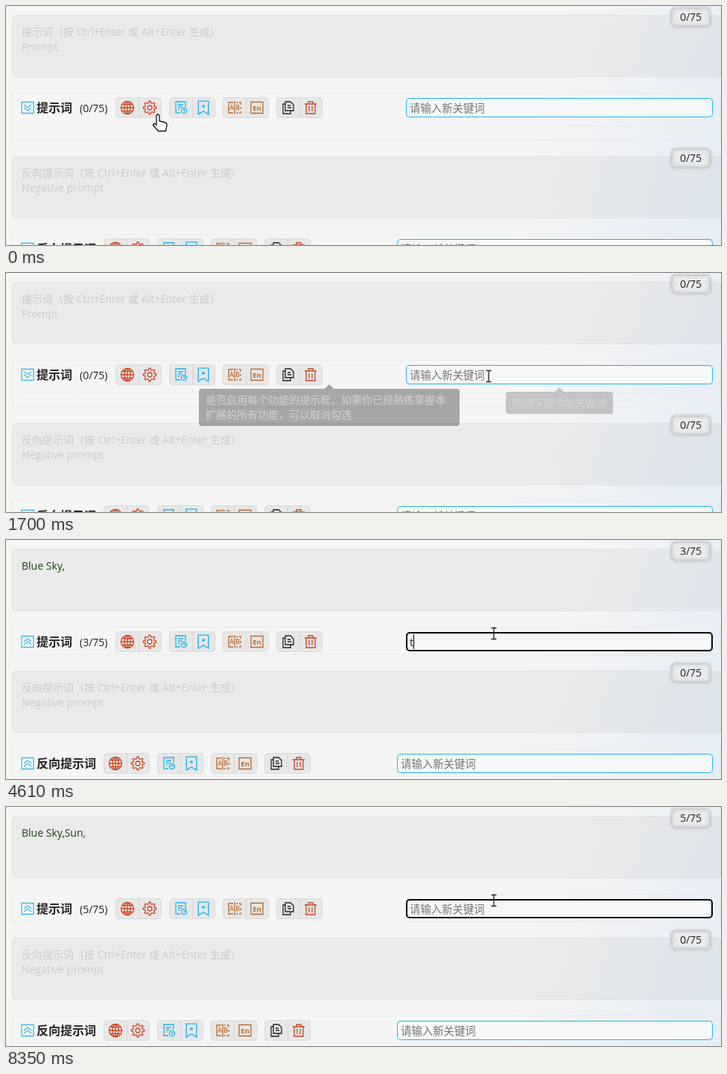
Recreate the animation shown at these times as an HTML page with a canvas. Size 960x322 px, loop 8420 ms.

```html
<!DOCTYPE html>
<html lang="zh">
<head>
<meta charset="utf-8">
<style>
html, body { margin: 0; width: 100%; height: 100%; overflow: hidden; background: #f5f5f5 }
canvas { display: block }
</style>
</head>
<body>
<canvas id="stage" width="960" height="322"></canvas>
<script>
const c = document.getElementById('stage').getContext('2d');
const LOOP = 8420;
const FONT = '"Open Sans", "Noto Sans CJK SC", "Noto Sans CJK", sans-serif';
const RED = '#cf4520', BLUE = '#1fb4ee', BROWN = '#bd6a2e', INK = '#222';

// [time, content of the keyword field]; latin letters are still being composed
const typing = [
  [1910, ''], [2700, 'l'], [2960, 'lan'], [3090, 'lant'], [3290, 'lanti'], [3420, 'lantia'],
  [3490, 'lantian'], [3620, '蓝天'], [3820, ''],
  [4610, 't'], [5070, 'ta'], [5200, 'tai'], [5340, 'taiy'], [5470, 'taiya'], [5600, 'taiyan'],
  [5740, 'taiyang'], [5870, '太阳'], [6220, ''],
  [6670, 'b'], [6800, 'ba'], [7000, 'bai'], [7070, 'baiy'], [7200, 'baiyu'], [7270, 'baiyun'],
  [7420, '白云'], [8350, '']
];
const candidates = {
  lant: '蓝天 蓝田 兰亭 烂摊', lan: '蓝 烂 栏 懒', l: '了 来 里 啦',
  taiy: '太阳 泰阳 太样', t: '他 太 台 抬', baiy: '白云 百韵 摆匀', b: '不 白 百 吧'
};
const pointer = [
  [0, 204, 146], [70, 204, 146], [200, 196, 138], [330, 206, 138], [560, 241, 138],
  [800, 241, 138], [970, 282, 138], [1240, 438, 138], [1460, 442, 138],
  [1700, 648, 139], [1840, 654, 138], [3819, 654, 138], [3820, 655, 126], [LOOP, 655, 126]
];

const ring = (rx, ry, x = 0, y = 0) =>
  `M${x - rx} ${y}a${rx} ${ry} 0 1 0 ${2 * rx} 0a${rx} ${ry} 0 1 0 ${-2 * rx} 0z`;
const polar = (n, radius) => 'M' + Array.from({ length: n }, (_, i) => {
  const a = (i - .5) / n * 2 * Math.PI - Math.PI / 2;
  return [radius(i) * Math.cos(a), radius(i) * Math.sin(a)].map(v => v.toFixed(2));
}).join('L') + 'z';

const shapes = {
  globe: ring(8.5, 8.5) + ring(4, 8.5) + 'M0-8.5v17M-8.5 0h17M-7.2-4.5h14.4M-7.2 4.5h14.4',
  gear: polar(32, i => i % 4 < 2 ? 8.8 : 6.4) + ring(3, 3),
  history: 'M6-1v-7h-13v15h6M-4-4h7M-4-1h5M-4 2h2' + ring(3.6, 3.6, 4, 4) + 'M4 2v2h2',
  bookmark: 'M-6.5-8.5h13v17l-6.5-4l-6.5 4z',
  star: polar(10, i => i % 2 ? 1.6 : 3.6),
  split: 'M-2-7h-6v14h6M0-9v18M2-7h2M6-7h2v3M8-1v3M8 5v2h-2M4 7h-2',
  frame: 'M-8-7.5h16v15h-16z',
  copy: 'M-4-8h7l4 4v8h-11zM-4-5h-3v13h10v-4M-1-3h4M-1 0h5',
  trash: 'M-8-5h16M-3-5v-3h6v3M-6-5v13h12v-13M-2-2v7M2-2v7',
  cloud: 'M-5 5h-4a5 5 0 0 1-1-10a8 8 0 0 1 16-1a5.500 5.500 0 0 1 4 11h-3M-3 9h8M-3 9l3-3M-3 9l3 3',
  field: 'M-5-6.500h13v13h-13M-8-6.500h4M-8 6.500h4M-6-6.500v13',
  bubble: 'M-8-8h16v13h-5l-3 3l-3-3h-5z',
  down: 'M-8-7.500h16v15h-16zM-5-4l5 4l5-4M-5 0l5 4l5-4',
  up: 'M-8-7.500h16v15h-16zM-5 0l5-4l5 4M-5 4l5-4l5 4',
  tick: 'M-4 0l3 3l5-6',
  hand: 'M-2 2q2-4 4 0v7l6 1.500q4 1 4 4l-1.500 8h-10l-7-8q1-3 3-1.500l1.500 1.500z'
};
for (const k in shapes) shapes[k] = new Path2D(shapes[k]);

const clamp = v => Math.max(0, Math.min(1, v));
const fade = (t, a, b, d, e) => Math.min(clamp((t - a) / (b - a)), clamp((e - t) / (e - d)));

function text(s, x, y, color, size = 14, weight = 400, align = 'left') {
  c.font = `${weight} ${size}px ${FONT}`;
  c.textAlign = align;
  c.fillStyle = color;
  c.fillText(s, x, y);
  return c.measureText(s).width;
}

function box(x, y, w, h, r, fill, stroke, line = 1) {
  c.beginPath();
  c.roundRect(x + line / 2, y + line / 2, w - line, h - line, r);
  if (fill) { c.fillStyle = fill; c.fill(); }
  if (stroke) { c.strokeStyle = stroke; c.lineWidth = line; c.stroke(); }
}

function icon(name, x, y, color, scale = 1, fill) {
  c.save();
  c.translate(x, y);
  c.scale(scale, scale);
  if (fill) { c.fillStyle = fill; c.fill(shapes[name]); }
  c.strokeStyle = color;
  c.lineWidth = 1.3;
  c.stroke(shapes[name]);
  c.restore();
}

function splitIcon(x, y, color, s = 1) {
  icon('split', x, y, color, s);
  text('A', x - 4 * s, y + 3.2 * s, color, 8.5 * s, 600, 'center');
  text('B', x + 4 * s, y + 3.2 * s, color, 8.5 * s, 600, 'center');
}

function englishIcon(x, y, color, s = 1) {
  icon('frame', x, y, color, s);
  text('En', x, y + 3.5 * s, color, 9.5 * s, 700, 'center');
}

function promptArea(y, count, alpha = 1) {
  box(8, y, 952, 84, 4, 'rgba(0,0,0,.043)', '#e0e1e2');
  c.save();
  c.globalAlpha = alpha;
  c.shadowColor = 'rgba(0,0,0,.15)';
  c.shadowBlur = 4;
  box(893, y - 10, 53, 26, 5, '#e9eaeb', '#cfd0d2', 2);
  c.restore();
  c.globalAlpha = alpha;
  text(count + '/75', 919.5, y + 8, INK, 14, 400, 'center');
  c.globalAlpha = 1;
}

function placeholder(y, first, second) {
  text(first + '（按 Ctrl+Enter 或 Alt+Enter 生成）', 21, y + 28, '#c9cacb');
  text(second, 21, y + 48, '#c9cacb');
}

function toolbar(y, label, groupX, folded, count) {
  c.strokeStyle = '#e9eaeb';
  c.lineWidth = 1;
  c.strokeRect(8.5, y + .5, 951, folded ? 37 : 63);
  if (!folded) {
    c.setLineDash([3, 2]);
    c.beginPath();
    c.moveTo(20, y + 44.5);
    c.lineTo(949, y + 44.5);
    c.stroke();
    c.setLineDash([]);
  }
  icon(folded ? 'up' : 'down', 29, y + 20, '#45b9e8');
  text(label, 41, y + 26, INK, 16, 700);
  if (count !== undefined) text(`(${count}/75)`, 99, y + 26, INK);
  const cy = y + 20;
  const draw = [
    x => icon('globe', x, cy, RED), x => icon('gear', x, cy, RED),
    x => icon('history', x, cy, BLUE),
    x => { icon('bookmark', x, cy, BLUE, 1.05); icon('star', x, cy - 2, BLUE, .6, BLUE); },
    x => splitIcon(x, cy, BROWN), x => englishIcon(x, cy, BROWN),
    x => icon('copy', x, cy, INK), x => icon('trash', x, cy, '#c04a24')
  ];
  for (let g = 0; g < 4; g++) {
    const x = groupX + 72 * g;
    box(x, y + 6, 62, 28, 4, '#e7e7e7', '#dadada');
    c.fillStyle = '#d8d8d8';
    c.fillRect(x + 31, y + 7, 1, 26);
    draw[2 * g](x + 16);
    draw[2 * g + 1](x + 46);
  }
}

function tooltip(cx, y, lines, alpha, width) {
  if (alpha <= 0) return;
  c.save();
  c.globalAlpha = alpha;
  c.font = `14px ${FONT}`;
  const w = width || c.measureText(lines[0]).width + 18, x = cx - w / 2;
  box(x, y, w, 10 + 20 * lines.length, 4, 'rgba(70,70,70,.9)', null, 0);
  c.beginPath();
  c.moveTo(cx - 6, y);
  c.lineTo(cx, y - 6);
  c.lineTo(cx + 6, y);
  c.fill();
  lines.forEach((s, i) => text(s, x + 9, y + 20 + 20 * i, '#fff'));
  c.restore();
}

function settingsPanel() {
  c.save();
  c.shadowColor = 'rgba(70,130,240,.45)';
  c.shadowBlur = 5;
  box(206, 118, 260, 38, 5, '#e6f2fe', '#a3c3f5');
  c.restore();
  icon('cloud', 231, 137, '#c93a34', 1.05);
  text('API', 231, 141, '#c93a34', 9.5, 600, 'center');
  for (let x = 257; x < 420; x += 52) {
    box(x, 129, 16, 16, 3, '#0d75f8', null, 0);
    icon('tick', x + 8, 137, '#fff', 1.1);
  }
  splitIcon(286.5, 137, BROWN, 1.4);
  englishIcon(338, 137, BROWN, 1.35);
  icon('field', 390, 137, '#28364a', 1.2);
  icon('bubble', 442, 137, INK, 1.35);
  text('T', 442, 140, INK, 13, 700, 'center');
}

function inputMethod(pinyin) {
  const key = Object.keys(candidates).find(k => pinyin.startsWith(k));
  const items = candidates[key].split(' ').concat(pinyin).map((s, i) => `${i + 1}.${s}`);
  c.font = `16px ${FONT}`;
  const end = items.reduce((x, s) => x + c.measureText(s).width + 15, 561);
  const w = Math.max(296, end + 59 - 545);
  const dark = c.createLinearGradient(0, 147, 0, 222);
  dark.addColorStop(0, '#30383a');
  dark.addColorStop(1, '#1d2325');
  c.save();
  c.shadowColor = 'rgba(0,0,0,.5)';
  c.shadowBlur = 6;
  c.shadowOffsetY = 2;
  box(545, 147, w, 75, 8, dark, '#2a3032');
  c.restore();
  const caret = 562 + text(pinyin, 561, 173, '#58dcd6', 16);
  c.fillStyle = '#ccc';
  c.fillRect(caret, 159, 1, 17);
  c.fillStyle = '#475053';
  c.fillRect(559, 183, w - 28, 1);
  const glow = c.createLinearGradient(555, 0, 535 + w, 0);
  glow.addColorStop(0, 'rgba(90,220,210,0)');
  glow.addColorStop(.5, '#6fe0d8');
  glow.addColorStop(1, 'rgba(90,220,210,0)');
  c.fillStyle = glow;
  c.fillRect(555, 218, w - 20, 1);
  let x = 561;
  items.forEach((s, i) => x += text(s, x, 205, i ? '#f5c443' : '#58dcd6', 16) + 15);
  for (const [ax, dx, color] of [[x + 6, -6, '#6b623f'], [x + 12, 6, '#f5c443']]) {
    c.beginPath();
    c.moveTo(ax, 194);
    c.lineTo(ax + dx, 199.5);
    c.lineTo(ax, 205);
    c.fillStyle = color;
    c.fill();
  }
  c.beginPath();
  c.arc(545 + w - 38, 168, 10, 0, 7);
  c.fillStyle = '#f3eeee';
  c.fill();
}

function drawPointer(t) {
  const i = pointer.findIndex(p => p[0] > t);
  const [t0, x0, y0] = pointer[i - 1], [t1, x1, y1] = pointer[i];
  const k = (t - t0) / (t1 - t0);
  const x = x0 + (x1 - x0) * k, y = y0 + (y1 - y0) * k;
  if (x < 537) return icon('hand', x, y, '#111', 1, '#fff');
  c.strokeStyle = '#222';
  c.lineWidth = 1.3;
  c.stroke(new Path2D(`M${x - 3.5} ${y - 7.5}h7M${x} ${y - 7.5}v15M${x - 3.5} ${y + 7.5}h7`));
}

function field(t) {
  const focused = t >= 1910;
  box(537, 124, 412, 26, 4, '#f5f7f8', focused ? '#080808' : BLUE, focused ? 2 : 1);
  const step = typing.filter(e => e[0] <= t).pop();
  const value = step ? step[1] : '';
  const width = text(value || '请输入新关键词', 542, 143, value ? INK : '#757575', 14.4);
  if (step && t < 8350 && (t - step[0]) % 1060 < 520) {
    c.fillStyle = '#000';
    c.fillRect(542 + (value ? Math.floor(width) : 0), 127, 1, 20);
  }
  const composing = /^[a-z]/.test(value);
  if (composing && !(value.length === 1 && t < step[0] + 70)) inputMethod(value);
}

function render(t) {
  const folded = t >= 3820, shift = folded ? -26 : 0;
  const tint = c.createLinearGradient(730, 90, 960, 160);
  tint.addColorStop(0, 'rgba(222,233,246,0)');
  tint.addColorStop(1, 'rgba(222,233,246,.6)');
  c.fillStyle = '#f5f5f5';
  c.fillRect(0, 0, 960, 322);
  c.fillStyle = tint;
  c.fillRect(0, 0, 960, 322);

  const tokens = t < 4150 ? 0 : t < 6280 ? 3 : 5;
  const badge = t < 4350 ? 0 : t < 7350 ? 3 : 5;
  const pending = Math.max(fade(t, 4150, 4350, 4350, 4550), fade(t, 7000, 7350, 7350, 7690));
  promptArea(12, badge, 1 - .5 * pending);
  if (!folded) placeholder(12, '提示词', 'Prompt');
  else text(t < 4150 ? '蓝天,' : 'Blue Sky,' + (t < 6220 ? '' : t < 6280 ? '太阳,' : 'Sun,'), 21, 40, '#1d4216');
  promptArea(202 + shift, 0);
  placeholder(202 + shift, '反向提示词', 'Negative prompt');

  toolbar(117, '提示词', 147, folded, tokens);
  toolbar(307 + shift, '反向提示词', 131, folded);
  box(525, 314 + shift, 424, 26, 4, '#f5f7f8', BLUE);
  text('请输入新关键词', 530, 333 + shift, '#757575', 14.4);

  if (t >= 140 && t < 1540) settingsPanel();
  tooltip(194, 158, ['设置：翻译接口、自动翻译、提示框等'], fade(t, 130, 300, 400, 580), 264);
  tooltip(231.5, 160, ['翻译接口: Velmora / 岑禾翻译'], fade(t, 380, 520, 750, 890));
  tooltip(278, 160, ['是否自动将关键词翻译为本地语言'], fade(t, 900, 1000, 1080, 1200));
  tooltip(434, 156, ['是否启用每个功能的提示框，如果你已经熟练掌握本', '扩展的所有功能，可以取消勾选'],
    fade(t, 1250, 1400, 1560, 1840), 350);
  field(t);
  tooltip(743, 160, ['按回车键添加关键词'], fade(t, 1640, 1840, 1900, 2040));
  drawPointer(t);
}

const start = performance.now();
(function tick() {
  render((performance.now() - start) % LOOP);
  requestAnimationFrame(tick);
})();
</script>
</body>
</html>
```
